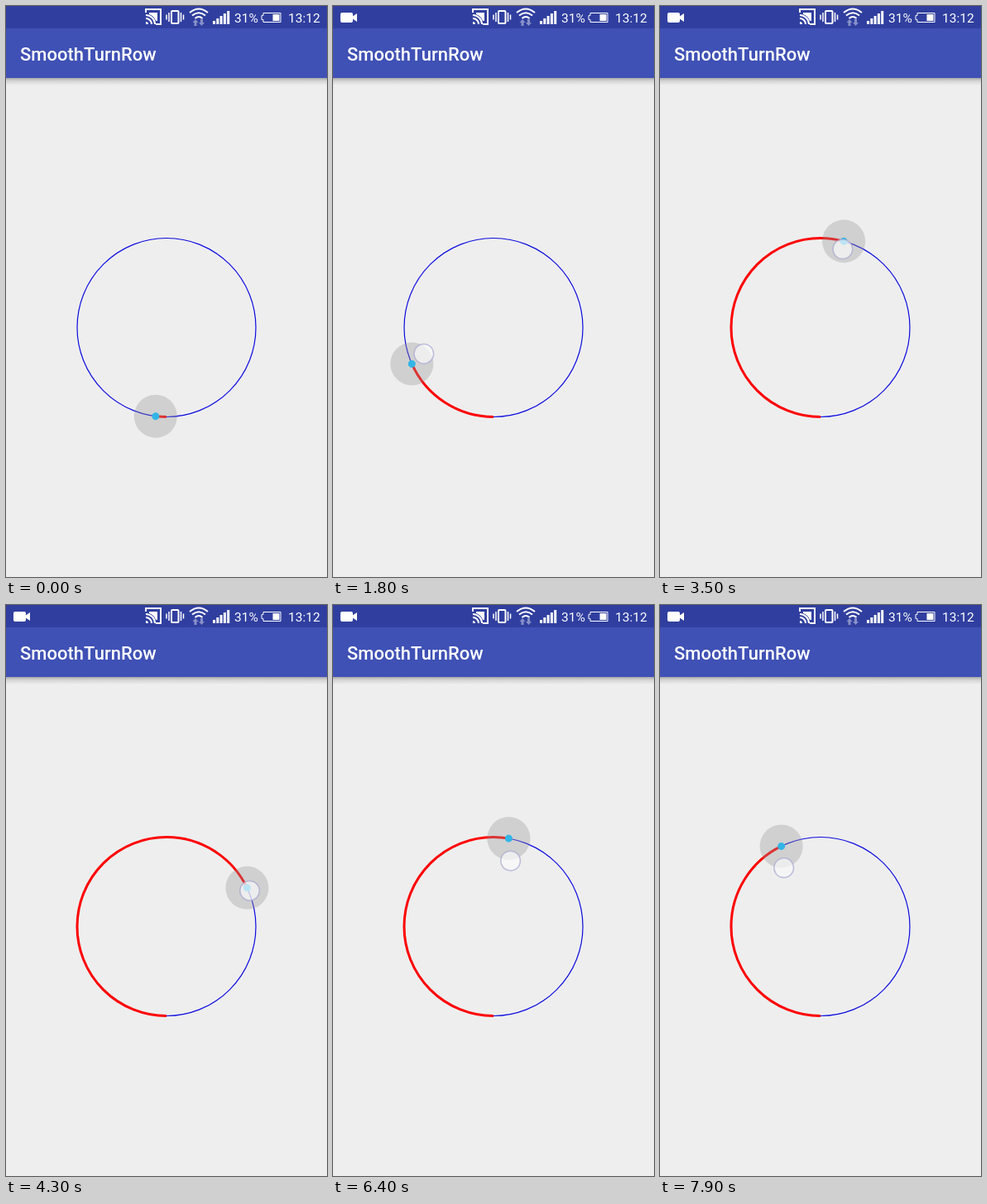
Recreate the animation shown at these times as an HTML page. Size 388 by 690 pixels, loop 8000 ms.

```html
<!DOCTYPE html>
<html lang="en">
<head>
<meta charset="utf-8">
<title>Circular slider</title>
<style>
  html, body { margin: 0; height: 100%; overflow: hidden; background: #eee; }
  svg { display: block; width: 100vw; height: 100vh; }
  text { font-family: Roboto, sans-serif; fill: #fff; }
  .line { fill: none; stroke: #fff; }
</style>
</head>
<body>
<svg viewBox="0 0 388 690">
  <defs>
    <linearGradient id="shade" x2="0" y2="1">
      <stop stop-color="#aaa"/>
      <stop offset=".4" stop-color="#d4d4d4"/>
      <stop offset="1" stop-color="#eee"/>
    </linearGradient>
  </defs>
  <rect width="388" height="690" fill="#eee"/>
  <rect y="87" width="388" height="9" fill="url(#shade)"/>
  <rect width="388" height="87" fill="#3f51b5"/>
  <rect width="388" height="27" fill="#303f9f"/>
  <text x="17" y="66" font-size="22" font-weight="500">SmoothTurnRow</text>

  <!-- status bar -->
  <g id="camera" fill="#fff">
    <rect x="9" y="8" width="15" height="12" rx="2"/>
    <path d="M23 13l6-4v10l-6-4z"/>
  </g>
  <g class="line" stroke-width="2">
    <path d="M169 8V4h18v18h-6M169 11a11 11 0 0 1 11 11M169 15a7 7 0 0 1 7 7"/>
    <path d="M173 8h10v10h-2a12 12 0 0 0-8-8z" fill="#fff" stroke="none"/>
    <path d="M169 19a3 3 0 0 1 3 3h-3z" fill="#fff" stroke="none"/>
    <rect x="200" y="6" width="8.500" height="15" rx="1"/>
    <path d="M197 8v11M211.500 8v11M194 10.500v6M214.500 10.500v6" stroke-width="1.500"/>
    <path d="M222 8q11-9 22 0M225 11.500q8-6.500 16 0M228.500 15q4.500-4 9 0"/>
  </g>
  <path d="M229 16l3.500 4h-2v4h-3v-4h-2zM236.500 24l-3.500-4h2v-4h3v4h2z" fill="#8790c8"/>
  <path d="M250 18h3v4h-3zM254.300 15h3v7h-3zM258.600 12h3v10h-3zM262.900 9h3v13h-3zM267.200 6h3v16h-3z" fill="#fff"/>
  <text x="276" y="20" font-size="15.500">31%</text>
  <path class="line" d="M311 8.500h21v11h-21v-3h-2v-5h2z"/>
  <rect x="322.500" y="10" width="8" height="8" fill="#fff"/>
  <text x="341" y="20" font-size="15.500">13:12</text>

  <!-- slider, angles run clockwise from the bottom -->
  <g transform="translate(194 388.500)">
    <circle r="108" fill="none" stroke="#0b0be0" stroke-width="1.200"/>
    <circle id="arc" r="108" fill="none" stroke="#f00" stroke-width="3" pathLength="360" transform="rotate(90)"/>
    <g id="thumb">
      <circle cy="108" r="26" fill="#969696" fill-opacity=".34"/>
      <circle cy="108" r="4.500" fill="#33b5e5"/>
    </g>
    <circle id="touch" r="11.800" fill="#fafafa" fill-opacity=".68" stroke="#aaaad2" stroke-opacity=".75" stroke-width="1.500"/>
  </g>
</svg>
<script>
  const LOOP = 8000, STEP = 100, LEAD = 25;
  // time, thumb angle, distance of the finger from the centre
  const keys = [
    [0, 7, 100], [900, 42, 95], [1100, 66, 93], [1200, 68.5, 92.7],
    [1800, 66, 90], [2500, 158.3, 84.3], [2700, 172, 86], [3600, 198, 100],
    [4300, 244.4, 109.5], [4500, 263, 109], [5500, 370, 108.7], [5600, 380, 107],
    [6400, 549.8, 82], [7100, 683, 100], [7200, 680, 100], [7900, 514, 83.6],
    [8000, 490, 84]
  ];
  const el = id => document.getElementById(id);
  const [camera, arc, thumb, touch] = ["camera", "arc", "thumb", "touch"].map(el);

  function sample(t, col) {
    const i = Math.max(1, keys.findIndex(k => k[0] >= t));
    const a = keys[i - 1], b = keys[i];
    return a[col] + (b[col] - a[col]) * (t - a[0]) / (b[0] - a[0]);
  }

  function draw(now) {
    const t = Math.floor(now % LOOP / STEP) * STEP;
    const angle = sample(t, 1) % 360;
    arc.setAttribute("stroke-dasharray", `${angle} 360`);
    thumb.setAttribute("transform", `rotate(${angle})`);
    // the finger runs slightly ahead of the thumb
    touch.setAttribute("transform", `rotate(${sample(t + LEAD, 1)}) translate(0 ${sample(t, 2)})`);
    touch.style.display = t < 100 ? "none" : "";
    camera.style.display = t < 300 ? "none" : "";
    requestAnimationFrame(draw);
  }
  requestAnimationFrame(draw);
</script>
</body>
</html>
```
